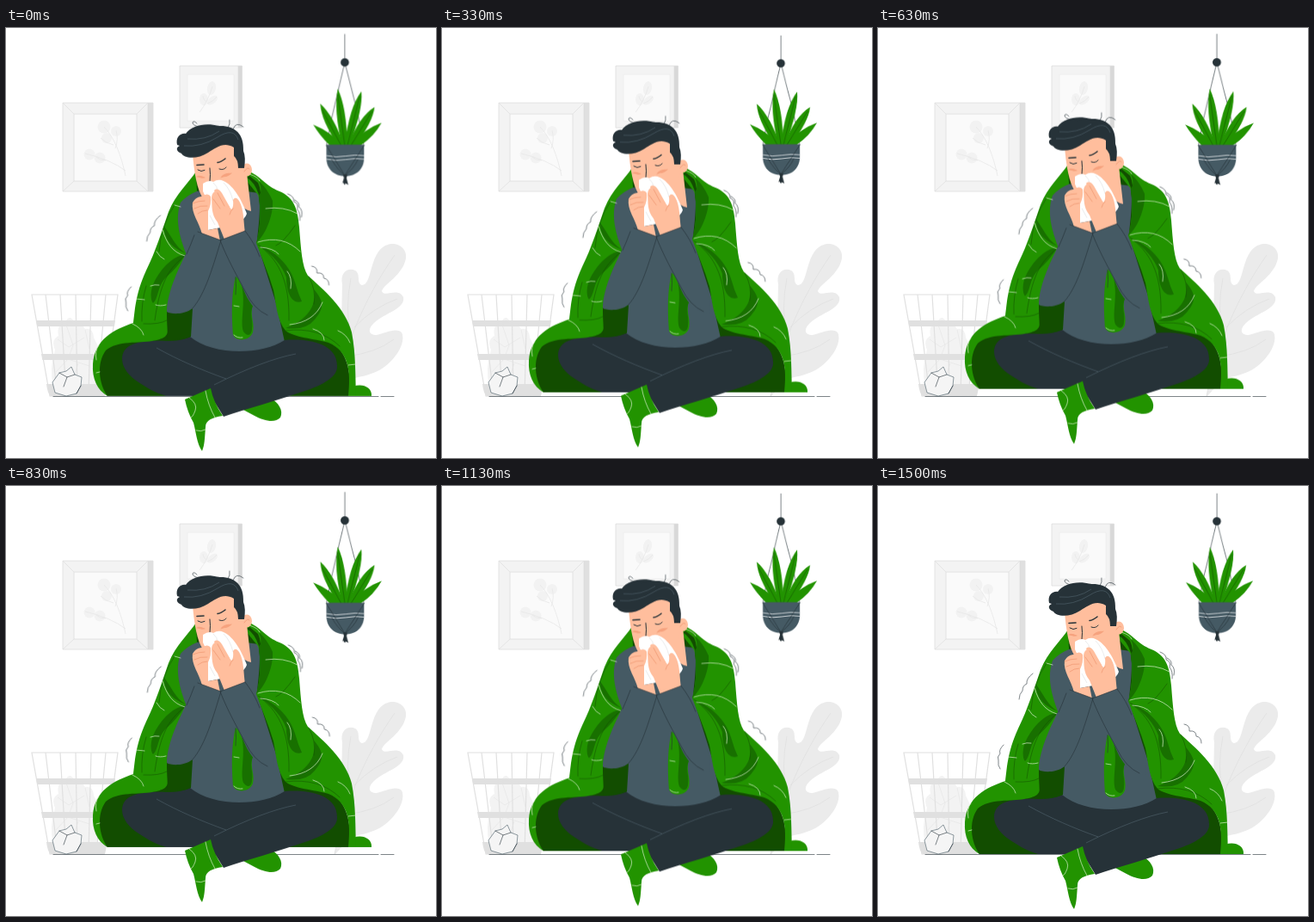
Animation of 500 by 500 pixels, one loop 1540 ms. Source, as an HTML page without scripts:

```html
<!DOCTYPE html>
<html lang="en">
<head>
<meta charset="utf-8">
<title>Shivering under a blanket</title>
<style>
  html, body { margin: 0; height: 100%; overflow: hidden; background: #fff; }
  svg { display: block; width: 100vw; height: 100vh; }

  .green { fill: #229300; }
  .fold { fill: #187000; }
  .deep { fill: #124d00; }
  .slate { fill: #455a64; }
  .navy { fill: #263238; }
  .skin { fill: #ffbe9d; }
  .pale { fill: #ebebeb; }
  .line { fill: none; stroke: #263238; stroke-width: .6; stroke-linecap: round; stroke-linejoin: round; }
  .seam { fill: none; stroke: #52666f; stroke-width: .6; }
  .stitch { fill: none; stroke: #d8efcf; stroke-width: .7; stroke-linecap: round; }
  .crease { fill: none; stroke: #124d00; stroke-width: .5; stroke-linecap: round; }
  .grey { fill: none; stroke: #e0e0e0; stroke-width: .8; }
  .sketch { fill: none; stroke: #e8e8e8; stroke-width: .8; }
  .wire { fill: none; stroke: #e0e0e0; stroke-width: 1.2; }
  .warm { fill: none; stroke: #eb8f68; stroke-width: .6; stroke-linecap: round; }

  .body { animation: breathe 770ms -60ms cubic-bezier(.37, 0, .63, 1) infinite alternate; }
  .shiver { animation: shiver 77ms linear infinite alternate; }
  .plant { transform-origin: 397px 97px; animation: pulse 1540ms -55ms ease-in-out infinite; }

  @keyframes breathe { to { transform: translateY(-8.6px); } }
  @keyframes shiver { from { transform: translateX(-.5px); } to { transform: translateX(.5px); } }
  @keyframes pulse {
    0%, 24.7%, 41.2%, 60.7%, 100% { transform: scale(1); }
    11.7% { transform: scale(1.09); }
    51% { transform: scale(1.085); }
  }
</style>
</head>
<body>
<svg viewBox="0 0 500 500">
  <!-- Wall pictures -->
  <g stroke="#dedede" stroke-width=".8">
    <path fill="#e0e0e0" d="M165 87h6v103h-6z"/>
    <path fill="#f3f3f3" d="M66 87h99v103h-99z"/>
    <path fill="#fafafa" d="M79 100h73v78h-73z"/>
    <path class="grey" d="M66 87l13 13M165 87l-13 13M66 190l13-12M165 190l-13-12"/>
    <path fill="#d8d8d8" d="M270 44h4.500v72h-4.500z"/>
    <path fill="#f3f3f3" d="M202 44h68v72h-68z"/>
    <path fill="#fafafa" stroke="#ededed" d="M211 54h54v54h-54z"/>
  </g>
  <g fill="#f2f2f2">
    <circle cx="114" cy="115" r="7.500"/><circle cx="128" cy="120" r="6"/>
    <circle cx="97" cy="147" r="6.500"/><circle cx="109" cy="151" r="6.500"/><circle cx="117" cy="128" r="6"/>
    <ellipse cx="239" cy="70" rx="5" ry="8" transform="rotate(12 239 70)"/>
    <ellipse cx="230" cy="83" rx="5" ry="7"/><ellipse cx="240" cy="84" rx="7" ry="4" transform="rotate(-40 240 84)"/>
  </g>
  <path class="sketch" d="M139 172C134 148 126 127 114 115M127 140Q131 130 128 119M125 136Q116 134 110 128M139 166Q122 153 92 146M116 154Q109 154 105 150M225 98Q235 85 240 68M233 86Q229 83 229 79M234 88Q242 85 245 80"/>

  <!-- Basket -->
  <path fill="#f3f3f3" d="M57 374Q52 363 61 358Q58 345 70 340Q75 333 80 343Q88 342 92 350Q101 348 102 360L112 380L106 415H55Q50 398 57 374Z"/>
  <path class="sketch" d="M60 362l13 9 18-11M70 345l8 24-6 16M92 351l5 22M58 400l14-15 25 8M76 414l8-24"/>
  <path fill="#e0e0e0" d="M35 340h92l-1 7H36.300zM41 379h79l-1 7H42.300zM47 414h71l-3 14H52Q48 424 47 414z"/>
  <path class="wire" d="M30 310h100l-16 118H51zM46 310l14 118M63 310l7 118M81 310l2 118M99 310l-3 118M116 310l-11 118"/>

  <!-- Floor leaf -->
  <path class="pale" d="M382 428C391 385 390 330 391 298C388 284 398 278 406 282C413 286 407 297 414 299C426 299 422 263 441 253C453 247 467 255 465 268C461 288 440 297 437 306C440 314 456 301 462 313C465 326 440 332 429 342C420 350 421 357 431 357C441 355 453 348 460 354C466 366 452 388 434 398C421 405 410 405 400 409L383 428Z"/>
  <path class="grey" d="M382 428C392 375 416 315 452 264M401 363Q394 325 401 291M405 348Q427 325 455 315M395 382Q430 378 451 362"/>

  <path class="line" d="M55 428.500H433M436 428.500H451"/>
  <path d="M54 412l8-11 8-2 6-5 4 9 8 3-1 10-5 9-12 3-13-4z" fill="#f5f5f5" stroke="#455a64" stroke-width=".6"/>
  <path class="line" d="M62 401l9 5 9-3M71 406l-4 11M82 425l5-9"/>

  <!-- Hanging plant -->
  <g class="plant">
    <path class="line" d="M394 9V37M394 41L379 105 373 136M394 41L409 100 416 136"/>
    <circle class="navy" cx="394" cy="41" r="4.800"/>
    <g class="green">
      <path d="M377 136Q365 124 358 112Q378 120 392 136z"/>
      <path d="M387 136Q367 108 366 88Q382 103 393 136z"/>
      <path d="M391 136Q381 95 386 71Q396 92 397 136z"/>
      <path d="M394 136Q399 92 413 74Q415 95 399 136z"/>
      <path d="M398 136Q410 103 428 92Q426 110 405 136z"/>
      <path d="M400 136Q416 117 436 110Q428 125 412 136z"/>
    </g>
    <path class="crease" d="M386 78L394 136M368 95L390 136M411 80L397 136M425 97L401 136"/>
    <path class="slate" d="M373 135H416V150C416 163 407 171 394.500 171S373 163 373 150Z"/>
    <path fill="none" stroke="#e8ecee" stroke-width=".8" d="M373 147.500q11 2.500 22 .5t21-.5M373 151.500q11 2.500 22 .5t21-.5"/>
    <path class="line" d="M373 136L394 170 416 136M379 152q7 12 15 18q10-7 15-18"/>
    <path class="navy" d="M392 169h5l-1 4 2 8-3-2-1 2-2-3-1 2 2-7z"/>
  </g>

  <!-- Person -->
  <g class="body">
    <!-- Blanket lining -->
    <path class="deep" d="M221 168L283 167L303 184L304 240L340 350C390 362 402 380 400 428H118C106 420 104 395 106 376L130 362L170 350L187 320L200 200Z"/>
    <path class="green" d="M404 417C414 413 426 418 425 428H402Z"/>

    <!-- Torso -->
    <path class="slate" d="M205 194C216 187 265 188 294 192C297 215 292 240 292 250L314 320L324 365C300 382 238 383 214 360L216 325L205 262C196 232 198 205 205 194Z"/>

    <!-- Hanging blanket edge -->
    <path class="green" d="M267 289C261 315 263 341 264 357C269 366 284 363 287 354C290 342 282 333 288 320L275 296Z"/>
    <path class="fold" d="M274 300C279 320 272 340 276 353C281 360 286 357 286 350C288 340 282 333 288 321Z"/>
    <path class="stitch" d="M265 357Q269 361 275 360M265 323l6 1"/>

    <!-- Socks and trousers -->
    <path class="green" d="M274 443L306 430C317 435 323 445 319 453C313 460 300 457 289 451Z"/>
    <path class="navy" d="M135 385C135 366 158 363 186 364C197 364 207 363 214 359C240 381 296 381 324 363C350 361 385 366 385 393C386 405 370 415 345 423C315 433 280 443 253 452L238 428H186C172 424 162 417 154 412C143 405 135 395 135 385Z"/>
    <path class="seam" d="M175 372C200 386 228 398 256 408M242 415Q300 386 337 379"/>
    <path class="green" d="M208 432L238 419Q241 435 252 451C240 453 232 456 232 464C231 478 231 485 228 492C222 484 221 470 218 459Q211 447 208 432Z"/>
    <path class="stitch" d="M232 422Q235 439 243 453M213 430q10 7 7 15t-5 8M221 468q6 2 11-1"/>

    <!-- Blanket, left side -->
    <path class="green" d="M221 167C211 182 198 192 189 214C182 234 174 260 163 282C150 310 150 330 148 343C125 351 103 362 101 391C100 408 106 421 118 428C108 414 105 390 116 375C130 363 155 367 170 364C182 362 190 359 188 348L187 331C190 306 203 281 210 264C202 244 196 222 203 203Q211 194 222 190Z"/>
    <path class="fold" d="M209 263C190 267 180 282 173 294C167 305 168 317 171 320C178 314 175 301 187 289Q199 279 209 263ZM209 262C193 256 183 245 184 231C192 241 196 254 209 262Z"/>
    <path class="deep" d="M187 331Q201 337 217 326L215 359Q204 364 188 363Z"/>
    <path class="crease" d="M209 264C192 278 180 290 173 340M163 300Q157 320 158 341M196 206Q180 230 178 260M160 344Q178 345 187 340"/>
    <path class="stitch" d="M182 235C187 251 194 261 208 265M196 206l7 2M175 260Q179 267 184 269M151 315l10 1M168 300q5-2 10-1M174 322q5 2 12 0M147 344Q158 349 160 357M108 369Q103 375 105 386M105 401l4-1"/>

    <!-- Blanket, right side -->
    <path class="green" d="M283 167C298 174 301 183 318 190C334 197 339 208 341 232C343 257 344 277 351 288C369 304 395 326 402 354C407 380 406 405 407 428H398C401 400 399 376 375 366C357 361 335 360 325 352C315 340 314 320 311 305C305 285 297 267 291 250C296 235 297 207 293 194Q282 181 277 174Z"/>
    <path class="deep" d="M280 174Q289 179 294 194L295 206Q298 190 293 180L283 172Z"/>
    <path class="fold" d="M294 195C297 218 295 238 291 250C304 238 311 215 310 201Q304 187 294 178Q299 190 294 195ZM293 252C318 262 332 280 337 299Q340 310 344 318C333 322 326 309 326 290Q319 270 293 252ZM325 349Q349 352 359 339C370 326 370 318 358 304C362 323 350 340 325 349Z"/>
    <path class="crease" d="M293 252C315 268 330 291 329 340M352 289Q361 305 358 321M336 230Q322 250 314 253M325 352Q364 347 388 370"/>
    <path class="stitch" d="M302 210Q323 207 339 216M293 249Q322 240 342 260M296 255Q311 256 317 263M330 345Q359 342 368 319M357 350Q370 354 370 363M327 283Q333 290 331 303M398 392l9-1M386 352Q396 356 400 366M283 170q10 3 12 8"/>

    <!-- Head -->
    <path class="skin" d="M257 184L279 160L285 213Q277 212 271 203Z"/>
    <ellipse class="skin" cx="280" cy="165" rx="6" ry="7.500"/>
    <path class="skin" d="M217 147C219 169 222 188 229 198L253 203Q273 195 278 168L272 130L238 134Z"/>
    <path class="warm" d="M277 167q4-6 6-3M222 173l9 1M250 174l12-5"/>
    <path fill="#f6a27e" d="M250 173q5-5 12-4q-3 5-12 4zM222 172q5-1 9 2q-5 2-9-2z"/>
    <path class="navy" d="M199 136C197 127 203 122 209 123C216 113 233 110 247 114C265 113 277 122 276 143Q279 150 277 163L270 163Q270 153 265 149L265 139C253 132 245 139 235 145C223 153 207 152 204 146C198 144 197 139 202 137Z"/>
    <path class="line" d="M247 114C235 117 217 116 217 110Q218 107 222 111M258 116Q261 112 260 107M264 118Q267 108 276 115"/>
    <path class="seam" d="M207 137Q227 139 246 127T270 130M211 129Q232 131 248 120"/>
    <path class="line" style="stroke-width:1.600" d="M222 159.500l8-.5M246 156.500Q250 156 255 152"/>
    <path class="line" style="stroke-width:1" d="M223 165q4 3 8 .5M248 164q5 2 8-2M237 163Q238 170 237 179"/>

    <!-- Tissue and hands -->
    <path fill="#fff" d="M229 181Q236 176 241 179Q247 175 253 178C266 184 275 203 280 216Q278 223 268 227Q256 232 250 232L235 235C232 220 236 202 229 190Z"/>
    <path fill="none" stroke="#dedede" stroke-width=".6" d="M241 180q5 4 5 10M253 180q8 8 11 21M237 218l6 11"/>
    <path class="skin" d="M228 240C225 226 215 216 217 203Q220 197 227 196Q235 191 238 196Q239 205 235 213L235 235L246 233L249 248Z"/>
    <path class="skin" d="M254 246L246 226C238 216 240 207 239 197Q240 189 246 190L257 204L262 211Q265 209 264 200Q267 195 271 201C277 211 276 225 278 238Z"/>
    <path class="skin" d="M242 189Q246 185 251 192L260 208L250 211Z"/>
    <path class="warm" d="M217 204q7-3 14-3M219 210q7-4 15-3M223 216q5-4 11-4M246 192l8 15M241 199l8 11M264 210q-3 3-4 7"/>

    <!-- Sleeves -->
    <path class="slate" d="M223 237L250 247C241 276 232 309 217 326C207 334 191 333 187 330C187 306 204 273 212 257Q217 242 223 237Z"/>
    <path class="slate" d="M249 247L278 236C291 254 311 295 312 335C297 338 284 324 276 304C265 281 255 263 249 247Z"/>
    <path class="line" d="M223 237L250 247C241 276 232 309 217 326M278 236L249 247C257 268 270 291 278 306Q288 327 304 334M219 241Q215 252 210 263M278 236Q289 250 295 266M267 290Q268 301 267 310"/>

    <!-- Shiver marks -->
    <g class="shiver">
      <path class="line" d="M180 218q-8 6-7 12q-5 2-5 8q-4 4-4 10M146 301q-6 6-4 10q-4 4-2 8q-1 6 2 10M328 193q8 3 7 9q6 2 4 9q4 4 3 13M336 200q6 3 5 8q5 4 3 12M356 277q7 1 6 8q8-1 8 6q6 1 6 8"/>
    </g>
  </g>
</svg>
</body>
</html>
```
